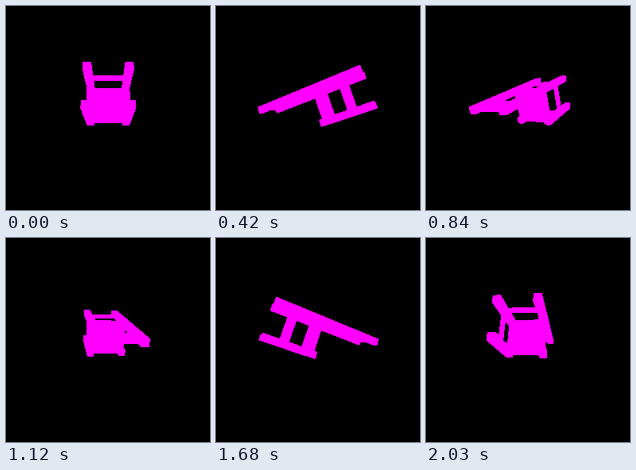
An HTML page for the animation above (2.1 s loop, 256x256 px).

```html
<!DOCTYPE html>
<html lang="en">
<head>
<meta charset="utf-8">
<title>Turning chair</title>
<style>
  html, body { margin: 0; width: 100%; height: 100%; overflow: hidden; background: #000; }
  svg { display: block; width: 256px; height: 256px; }
</style>
</head>
<body>
<svg viewBox="0 0 256 256"><path id="chair" fill="#f0f" shape-rendering="crispEdges"/></svg>
<script>
const chair = document.getElementById('chair');
const STEP_MS = 70, STEPS = 30;
const CENTER_X = 128.3, CENTER_Y = 127.8, DISTANCE = 255;
const TILT = 19.5 * Math.PI / 180;
const COS_T = Math.cos(TILT), SIN_T = Math.sin(TILT);

// Boxes as [u0, u1, v0, v1, w0, w1]: u along the legs, v back to front, w sideways.
const SIDE = 21, DEPTH = 20.5, HALF = 4.2;
const RUNG = [37.5, 43];
const rail = (u0, u1, v, w) => [u0, u1, v - HALF, v + HALF, w - HALF, w + HALF];
const crossbar = (u0, u1, v) => [u0, u1, v - 2, v + 2, -SIDE, SIDE];
const boxes = [
  [7, 12, -22, 22, -23, 23],             // seat
  crossbar(-64, -42, -DEPTH),            // back slat
  crossbar(...RUNG, -DEPTH),             // back rung
  crossbar(...RUNG, DEPTH),              // front rung
];
for (const w of [-SIDE, SIDE]) {
  boxes.push(
    rail(-67, 66.5, -DEPTH, w),          // back leg and post
    rail(4, 67, DEPTH - 0.5, w),         // front leg
    [...RUNG, -DEPTH, DEPTH, w - 2, w + 2] // side rung
  );
}

function project(u, v, w, angle) {
  const p = u * COS_T + v * SIN_T;
  const y = v * COS_T - u * SIN_T;
  const sin = Math.sin(angle), cos = Math.cos(angle);
  const scale = DISTANCE / (DISTANCE - (p * cos - w * sin));
  return [CENTER_X + scale * (p * sin + w * cos), CENTER_Y + scale * y];
}

function corners([u0, u1, v0, v1, w0, w1], angle) {
  const points = [];
  for (const u of [u0, u1])
    for (const v of [v0, v1])
      for (const w of [w0, w1]) points.push(project(u, v, w, angle));
  return points;
}

function halfHull(points) {
  const chain = [];
  for (const c of points) {
    while (chain.length > 1) {
      const a = chain[chain.length - 2], b = chain[chain.length - 1];
      if ((b[0] - a[0]) * (c[1] - a[1]) - (b[1] - a[1]) * (c[0] - a[0]) > 0) break;
      chain.pop();
    }
    chain.push(c);
  }
  return chain.slice(0, -1);
}

function hull(points) {
  points.sort((a, b) => a[0] - b[0] || a[1] - b[1]);
  const lower = halfHull(points);
  return lower.concat(halfHull(points.reverse()));
}

function draw(time) {
  const step = Math.floor(time / STEP_MS) % STEPS;
  const angle = step / STEPS * 2 * Math.PI;
  const outlines = boxes.map(box => 'M' + hull(corners(box, angle)).join('L') + 'Z');
  chair.setAttribute('d', outlines.join(''));
}

const start = performance.now();
function tick() {
  draw(performance.now() - start);
  requestAnimationFrame(tick);
}
tick();
</script>
</body>
</html>
```
